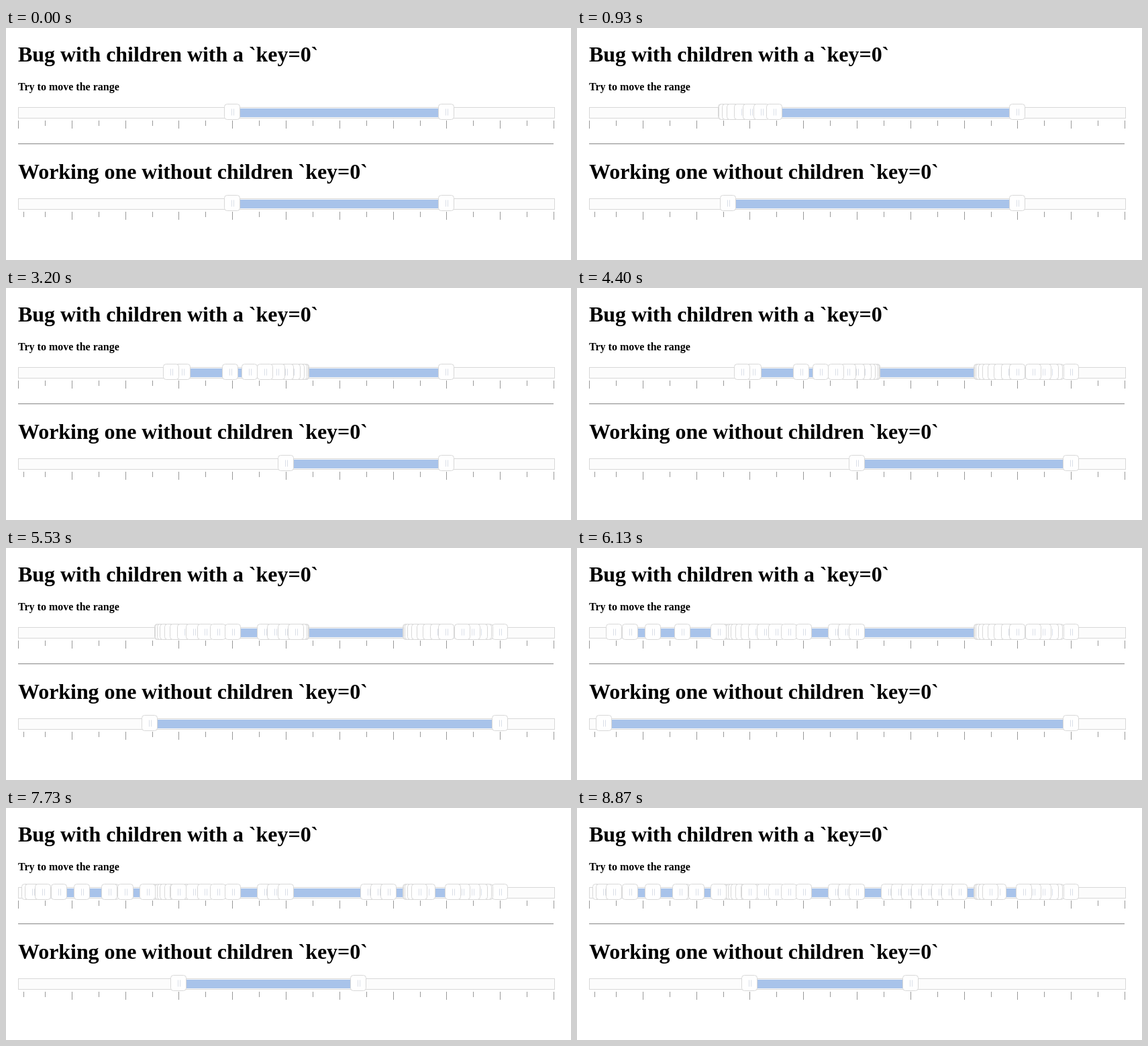
Write an HTML page that moves like this. It is 842 px wide and 346 px high and loops after 8940 ms.

```html
<!DOCTYPE html>
<html lang="en">
<head>
<meta charset="utf-8">
<title>Range sliders</title>
<style>
  html, body { margin: 0; width: 100%; height: 100%; overflow: hidden; background: #fff; }
  svg { display: block; }
  text { font: bold 32px "Liberation Serif", "Times New Roman", serif; letter-spacing: -.05px; }
  .small { font-size: 16px; letter-spacing: 0; }
  .track { fill: #fcfcfc; stroke: #d8d8d8; }
  .bar { fill: #a8c3ea; }
  .tick { fill: #999; }
</style>
</head>
<body>
<svg width="842" height="346" viewBox="0 0 842 346">
  <defs>
    <g id="handle">
      <rect x="-11.5" y="-4.5" width="23" height="23" rx="4" fill="#fff" stroke="#d8d8d8"/>
      <path d="M-.5 2.5v10M2.5 2.5v10" stroke="#dadfe8"/>
    </g>
  </defs>
  <text x="18" y="50">Bug with children with a `key=0`</text>
  <text class="small" x="18" y="93">Try to move the range</text>
  <rect x="18" y="172" width="798" height="1" fill="#9a9a9a"/>
  <rect x="18" y="173" width="798" height="1" fill="#e4e4e4"/>
  <text x="18" y="225">Working one without children `key=0`</text>
  <g id="top" transform="translate(0 118)"></g>
  <g id="bottom" transform="translate(0 254)"></g>
</svg>
<script>
const LOOP = 8940, LAG = 60, LEFT = 0, RIGHT = 1;
const HOME = [337, 656];

// A run of n positions from a to b, slowing down by the given power.
const glide = (a, b, n, power = 1) => Array.from({ length: n }, (_, i) =>
  Math.round(b + (a - b) * (1 - i / (n - 1)) ** power));

// One drag between two times; wipe is the range of stale handles it clears.
const drag = (side, from, to, wipe, ...path) => ({ side, from, to, wipe, path: path.flat() });

const drags = [
  drag(LEFT, 400, 928, [0, 645], glide(294, 222, 8, 2), 225),
  drag(LEFT, 995, 1998, [0, 645], glide(461, 495, 4, 2), glide(446, 246, 13, 1.5), HOME[LEFT]),
  drag(LEFT, 2270, 3128, [0, 645], glide(246, 263, 2), glide(334, 440, 11, 3), 417),
  drag(RIGHT, 3135, 4060, [650, 660], glide(656, 603, 9, 2), glide(680, 714, 5, 2), 736),
  drag(LEFT, 4470, 5526, [0, 434], glide(432, 386, 4), glide(338, 233, 12, 2.5), 214),
  drag(LEFT, 5595, 6195, [418, 450], glide(211, 35, 7, 2)),
  drag(LEFT, 6270, 6536, [0, 0], glide(154, 178, 2), 257),
  drag(RIGHT, 7200, 8125, [612, 660], 666, glide(616, 628, 2), glide(570, 465, 8), 497)
];

function add(parent, tag, attrs) {
  const el = document.createElementNS("http://www.w3.org/2000/svg", tag);
  for (const k in attrs) el.setAttribute(k, attrs[k]);
  return parent.appendChild(el);
}

const addHandle = (g, x) => add(g, "use", { href: "#handle", x });

function slider(id, firstX, firstH) {
  const g = document.getElementById(id);
  add(g, "rect", { class: "track", x: 18.5, y: 0.5, width: 799, height: 16 });
  for (let i = 0; i <= 20; i++) {
    add(g, "rect", {
      class: "tick",
      x: i ? Math.round(18 + i * 39.9) : firstX,
      y: 20,
      width: 1,
      height: i ? (i % 2 ? 8 : 12) : firstH
    });
  }
  const bar = add(g, "rect", { class: "bar", y: 2, height: 13 });
  return { g, bar };
}

function setBar({ bar }, a, b) {
  bar.setAttribute("x", a);
  bar.setAttribute("width", b - a);
}

const buggy = slider("top", 18, 12);
const working = slider("bottom", 26, 8);
const thumbs = HOME.map(x => addHandle(working.g, x));

const stops = HOME.map((x, side) =>
  ({ x, side, on: 0, shownAt: 0, off: Infinity, el: addHandle(buggy.g, x) }));

for (const { side, from, to, wipe: [lo, hi], path } of drags) {
  for (const p of stops)
    if (p.x >= lo && p.x <= hi) p.off = Math.min(p.off, from + LAG);
  const step = (to - from) / (path.length - 1);
  const added = path.map((x, i) => {
    const on = from + i * step;
    return { x, side, on, shownAt: on + LAG, off: Infinity };
  });
  // Within a drag the newest handle lies lowest.
  for (const p of [...added].reverse()) p.el = addHandle(buggy.g, p.x);
  stops.push(...added);
}

function draw(t) {
  const now = [...HOME];
  const visible = [];
  for (const p of stops) {
    if (p.on <= t) now[p.side] = p.x;
    const shown = p.shownAt <= t && t < p.off;
    p.el.style.display = shown ? "" : "none";
    if (shown) visible.push(p.x);
  }
  setBar(buggy, Math.min(...visible), Math.max(...visible));
  setBar(working, ...now);
  thumbs.forEach((el, i) => el.setAttribute("x", now[i]));
}

const start = performance.now();
function tick() {
  draw((performance.now() - start) % LOOP);
  requestAnimationFrame(tick);
}
draw(0);
requestAnimationFrame(tick);
</script>
</body>
</html>
```
